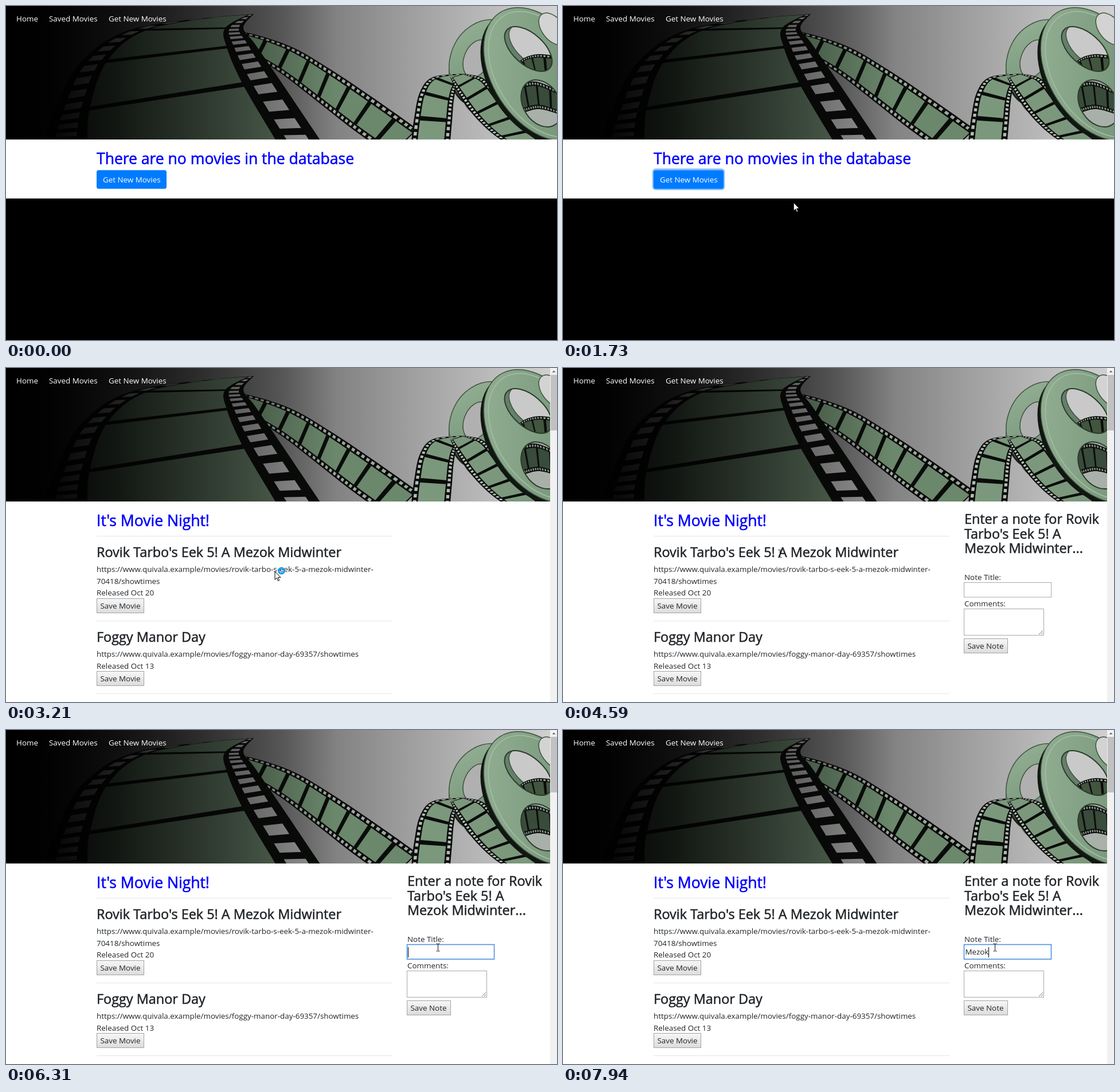
These frames come from a looping animation (961 by 583 pixels, 8 s). An HTML page:

```html
<!DOCTYPE html>
<html lang="en">
<head>
<meta charset="utf-8">
<title>Movie night</title>
<style>
html, body { margin: 0; width: 100%; height: 100%; overflow: hidden; background: #000; }
svg { display: block; width: 961px; height: 583px; }
text { font: 13.4px "Open Sans", "Noto Sans", sans-serif; fill: #212529; white-space: pre; }
.nav, .cta { fill: #fff; }
.h2 { font-size: 26.5px; fill: #00f; stroke: #00f; stroke-width: .55px; }
.h3 { font-size: 23.4px; stroke: #212529; stroke-width: .55px; }
.rule { fill: #e5e5e5; }
.btn { fill: url(#face); stroke: #a3a3a3; }
.field { fill: #fff; stroke: #a9a9a9; }
</style>
</head>
<body>
<svg id="stage" viewBox="0 0 961 583">
  <defs>
    <linearGradient id="wall">
      <stop offset="0" stop-color="#333"/><stop offset=".5" stop-color="#6d6d6d"/>
      <stop offset=".72" stop-color="#9c9c9c"/><stop offset="1" stop-color="#d2d2d2"/>
    </linearGradient>
    <linearGradient id="shade">
      <stop offset="0"/><stop offset=".08" stop-opacity=".97"/><stop offset=".2" stop-opacity=".8"/>
      <stop offset=".4" stop-opacity=".42"/><stop offset=".6" stop-opacity="0"/>
    </linearGradient>
    <linearGradient id="metal" x2=".8" y2="1">
      <stop offset="0" stop-color="#96b297"/><stop offset=".5" stop-color="#82a083"/><stop offset="1" stop-color="#6d8b6e"/>
    </linearGradient>
    <linearGradient id="face" x2="0" y2="1">
      <stop offset="0" stop-color="#f7f7f7"/><stop offset="1" stop-color="#dcdcdc"/>
    </linearGradient>
    <clipPath id="bannerClip"><path d="M0 0H961V233H0z"/></clipPath>
    <clipPath id="upperHole"><ellipse cx="911" cy="75" rx="50" ry="27" transform="rotate(42 911 75)"/></clipPath>
    <clipPath id="lowerHole"><ellipse cx="934" cy="170" rx="32" ry="44" transform="rotate(-32 934 170)"/></clipPath>
  </defs>

  <g id="banner" clip-path="url(#bannerClip)"></g>
  <g id="nav"></g>

  <g id="emptyPage">
    <path d="M0 233H961V336H0z" fill="#fff"/>
    <rect id="ring" x="157" y="285" width="124" height="35" rx="4.5" fill="none" stroke="#80bdff" stroke-width="2.4"/>
    <rect id="cta" x="158" y="286.5" width="122" height="32.5" rx="3.5"/>
  </g>

  <g id="listPage">
    <path d="M0 233H949V583H0z" fill="#fff"/>
    <path d="M949 0h12v583h-12z" fill="#f1f1f1"/>
    <path d="M950 12h11v97h-11z" fill="#c1c1c1"/>
    <path d="M952.5 7.5l3-3 3 3z" fill="#606060"/>
  </g>

  <g id="notePanel">
    <rect id="titleField" class="field" x="699.5" y="374.5" width="152" height="25.5"/>
    <rect class="field" x="699.5" y="420.5" width="139" height="46"/>
    <path d="M830 465l7-7M834 465l3-3" stroke="#777"/>
    <text id="typed" x="701.5" y="392"></text>
    <path id="caret" d="M.5 379v18" stroke="#000"/>
  </g>

  <g id="cursor">
    <path id="arrow" d="M.5 .5V15l3.3-3.1 2.3 5.2 2.1-.9-2.3-5.1h4.6z" fill="#fff" stroke="#000"/>
    <path id="beam" d="M-3-6.5h2.2l.8.7.8-.7H3M-3 6.5h2.2L0 5.8l.8.7H3M0-6V6" fill="none" stroke="#111"/>
    <circle id="busy" cx="12" cy="-.5" r="4.8" fill="none" stroke="#1c9df0" stroke-width="3.4"/>
  </g>
</svg>
<script>
const NS = 'http://www.w3.org/2000/svg';
const LOOP = 8000;
const $ = id => document.getElementById(id);

function add(parent, tag, attrs, content = '') {
  const el = document.createElementNS(NS, tag);
  for (const k in attrs) el.setAttribute(k, attrs[k]);
  el.textContent = content;
  return parent.appendChild(el);
}
const label = (parent, x, y, str, cls = '') => add(parent, 'text', { x, y, class: cls }, str);
const rule = (parent, y) => add(parent, 'rect', { class: 'rule', x: 158, y, width: 516, height: 1 });

function button(parent, x, y, w, str) {
  add(parent, 'rect', { class: 'btn', x: x + .5, y: y + .5, width: w - 1, height: 25 });
  label(parent, x + 6.5, y + 18, str);
}

// Banner artwork
function spline(pts, u) {
  const s = Math.max(0, Math.min(u, 1)) * (pts.length - 1);
  const i = Math.min(Math.floor(s), pts.length - 2), f = s - i;
  const p = k => pts[Math.max(0, Math.min(i + k, pts.length - 1))];
  return [0, 1].map(c => {
    const [a, b, d, e] = [p(-1)[c], p(0)[c], p(1)[c], p(2)[c]];
    return b + f * (d - a + f * (2 * a - 5 * b + 4 * d - e + f * (3 * (b - d) + e - a))) / 2;
  });
}

// A film strip between two edge curves, with picture cells and sprocket holes
function film(parent, { a, b, frames, holes, band = .16, fill, hole, gap = .08 }) {
  const at = (u, v) => {
    const p = spline(a, u), q = spline(b, u);
    return [0, 1].map(c => (p[c] + (q[c] - p[c]) * v).toFixed(1)).join(' ');
  };
  const cell = (u0, u1, v0, v1, n) => {
    const pts = [];
    for (let i = 0; i <= n; i++) pts.push(at(u0 + (u1 - u0) * i / n, v0));
    for (let i = n; i >= 0; i--) pts.push(at(u0 + (u1 - u0) * i / n, v1));
    return `M${pts.join('L')}z`;
  };
  const row = (count, pad, v0, v1, n) => Array.from({ length: count },
    (_, i) => cell((i + pad) / count, (i + 1 - pad) / count, v0, v1, n)).join('');
  add(parent, 'path', { d: cell(0, 1, 0, 1, 40), fill: '#0a0c0a' });
  add(parent, 'path', { d: row(frames, gap, band, 1 - band, 8), fill });
  add(parent, 'path', {
    d: row(holes, .22, band * .25, band * .75, 2) + row(holes, .22, 1 - band * .75, 1 - band * .25, 2),
    fill: hole
  });
}

function oval(parent, cx, cy, rx, ry, turn, fill, extra = {}) {
  add(parent, 'ellipse', { cx, cy, rx, ry, fill, transform: `rotate(${turn} ${cx} ${cy})`, ...extra });
}

function drawBanner(g) {
  add(g, 'rect', { width: 961, height: 233, fill: 'url(#wall)' });
  const edge = { stroke: '#3e533f', 'stroke-width': 1.5 };

  // Rear reel
  oval(g, 836, 102, 62, 78, 18, '#172017');
  oval(g, 840, 100, 66, 77, 18, 'url(#metal)', edge);
  oval(g, 821, 92, 22, 34, 22, '#b0b0b0', edge);
  oval(g, 834, 174, 38, 21, 25, '#b8b8b8', edge);

  // Ribbons
  film(g, {
    a: [[300, 26], [410, 44], [495, 70], [565, 110], [640, 160], [718, 215]],
    b: [[330, 40], [400, 70], [474, 114], [542, 166], [603, 214], [670, 262]],
    frames: 10, holes: 44, fill: '#6b886c', hole: '#a0a6a0'
  });
  film(g, {
    a: [[64, 240], [83, 189], [127, 102], [215, 42], [375, 18]],
    b: [[552, 240], [476, 127], [434, 66], [414, 38], [432, 14]],
    frames: 4, holes: 16, band: .16, gap: .045, fill: '#5b705c', hole: '#9a9a9a'
  });
  film(g, {
    a: [[706, 245], [712, 195], [722, 150], [745, 124], [800, 118]],
    b: [[774, 245], [778, 200], [781, 165], [787, 140], [805, 126]],
    frames: 4, holes: 20, fill: '#7b987c', hole: '#b4bcb4'
  });
  film(g, {
    a: [[800, 118], [835, 128], [865, 165], [900, 205], [940, 237]],
    b: [[775, 125], [790, 155], [815, 190], [845, 220], [880, 245]],
    frames: 6, holes: 28, fill: '#7b987c', hole: '#b9c2b9'
  });

  // Front reel
  oval(g, 925, 125, 82, 127, -33, '#101610');
  oval(g, 931, 119, 82, 128, -33, 'url(#metal)', edge);
  oval(g, 933, 119, 76, 121, -33, 'none', { stroke: '#a5bfa6', 'stroke-width': 1.5 });

  const upper = add(g, 'g', { 'clip-path': 'url(#upperHole)' });
  add(upper, 'rect', { x: 850, y: 20, width: 111, height: 110, fill: '#65806a' });
  oval(upper, 917, 70, 48, 26, 42, '#c9c9c9', edge);
  film(upper, {
    a: [[888, 104], [905, 90], [930, 84], [965, 88]],
    b: [[902, 125], [916, 118], [935, 122], [965, 126]],
    frames: 4, holes: 18, fill: '#42553f', hole: '#93a094'
  });
  oval(g, 911, 75, 50, 27, 42, 'none', { stroke: '#2b3b2c', 'stroke-width': 2 });
  oval(g, 954, 40, 32, 19, 52, '#d3d3d3', edge);

  const lower = add(g, 'g', { 'clip-path': 'url(#lowerHole)' });
  add(lower, 'rect', { x: 880, y: 115, width: 81, height: 115, fill: '#a9b0a9' });
  film(lower, {
    a: [[888, 138], [925, 132], [968, 150]],
    b: [[900, 187], [930, 180], [968, 190]],
    frames: 4, holes: 18, fill: '#394b3a', hole: '#88958a'
  });
  oval(g, 934, 170, 32, 44, -32, 'none', { stroke: '#2b3b2c', 'stroke-width': 2 });
  add(g, 'rect', { width: 961, height: 233, fill: 'url(#shade)' });
}

// Page content
const site = 'https://www.quivala.example/movies/';
const movies = [
  { y: 293, name: "Rovik Tarbo's Eek 5! A Mezok Midwinter", day: 20,
    url: [site + 'rovik-tarbo-s-eek-5-a-mezok-midwinter-', '70418/showtimes'] },
  { y: 441, name: 'Foggy Manor Day', day: 13,
    url: [site + 'foggy-manor-day-69357/showtimes'] }
];

function drawPages() {
  label($('nav'), 18, 27, 'Home', 'nav');
  label($('nav'), 75, 27, 'Saved Movies', 'nav');
  label($('nav'), 179, 27, 'Get New Movies', 'nav');

  label($('emptyPage'), 158, 276, 'There are no movies in the database', 'h2');
  label($('emptyPage'), 169, 308, 'Get New Movies', 'cta');

  const list = $('listPage');
  label(list, 158, 276, "It's Movie Night!", 'h2');
  for (const { y, name, day, url } of movies) {
    rule(list, y);
    label(list, 158, y + 37, name, 'h3');
    url.forEach((line, i) => label(list, 158, y + 63 + i * 20.5, line));
    const end = y + 63 + url.length * 20.5;
    label(list, 158, end, 'Released Oct ' + day);
    button(list, 158, Math.floor(end + 5), 83, 'Save Movie');
  }
  rule(list, 568);

  const note = $('notePanel');
  ['Enter a note for Rovik', "Tarbo's Eek 5! A", 'Mezok Midwinter...']
    .forEach((line, i) => label(note, 700, 272 + i * 25.7, line, 'h3'));
  label(note, 700, 369.5, 'Note Title:');
  label(note, 700, 415.5, 'Comments:');
  button(note, 699, 472, 77, 'Save Note');
}

// Pointer trips: start and end of the visible steps, their count, end points
const trips = [
  { t0: 70, t1: 490, n: 7, from: [800, 509], to: [211, 308.5], enters: true },
  { t0: 1500, t1: 1880, n: 6, from: [211, 308.5], to: [468.5, 354.5] },
  { t0: 3900, t1: 4360, n: 7, from: [468.5, 354.5], to: [378.5, 324] },
  { t0: 4760, t1: 5290, n: 9, from: [378.5, 324], to: [753.5, 379.5] }
];
const keyTimes = [6690, 7150, 7640, 7780, 7940];
const noteTitle = 'Mezok';

function pointer(t) {
  const trip = trips.filter(p => t >= p.t0).pop();
  if (!trip) return null;
  const { t0, t1, n, from, to, enters } = trip;
  const k = Math.min(n - 1, Math.floor((t - t0) / (t1 - t0) * (n - 1) + 1e-6));
  const f = enters ? k / (n - 1) : (k + 1) / n;
  const e = f * f * (3 - 2 * f);
  return from.map((v, i) => v + (to[i] - v) * e);
}

const show = (id, on) => $(id).setAttribute('visibility', on ? 'visible' : 'hidden');

function render(t) {
  const listed = t >= 3210, noting = t >= 4590, focused = t >= 5290;
  $('emptyPage').style.display = listed ? 'none' : '';
  $('listPage').style.display = listed ? '' : 'none';
  $('notePanel').style.display = noting ? '' : 'none';

  const pos = pointer(t);
  $('cursor').style.display = pos ? '' : 'none';
  if (pos) {
    const [x, y] = pos;
    const beam = t >= 3900 && (x < 600 || x > 700);
    $('cursor').setAttribute('transform', `translate(${x.toFixed(1)} ${y.toFixed(1)})`);
    show('arrow', !beam);
    show('beam', beam);
    show('busy', t >= 2970 && t < 3900);
  }

  const hover = pos && pos[0] > 158 && pos[0] < 280 && pos[1] > 286 && pos[1] < 319;
  $('cta').setAttribute('fill', hover ? '#0069d9' : '#007bff');
  $('ring').setAttribute('opacity', t < 960 ? 0 : t < 1040 ? .75 : 1);

  $('titleField').style.stroke = focused ? '#4d90e0' : '';
  $('titleField').style.strokeWidth = focused ? 1.6 : '';
  const typed = $('typed');
  typed.textContent = noteTitle.slice(0, keyTimes.filter(k => t >= k).length);
  const end = typed.textContent ? typed.getComputedTextLength() : 0;
  $('caret').setAttribute('transform', `translate(${Math.round(701 + end)} 0)`);
  $('caret').style.display = focused && !(t >= 5760 && t < 6310) ? '' : 'none';
}

drawBanner($('banner'));
drawPages();
const start = performance.now();
function tick() {
  render((performance.now() - start) % LOOP);
  requestAnimationFrame(tick);
}
tick();
</script>
</body>
</html>
```
